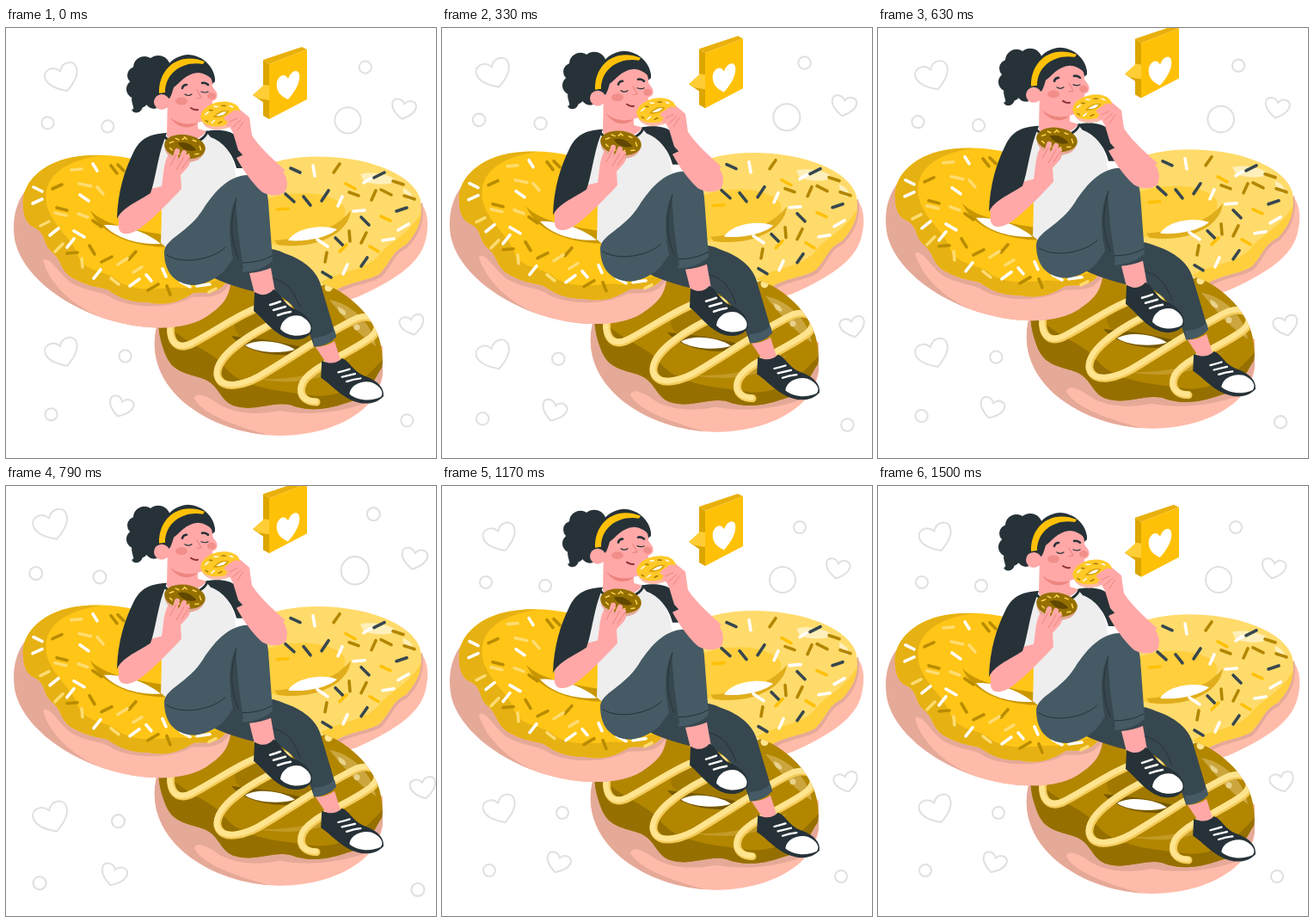
Recreate the animation shown at these times as an HTML page. Size 500 by 500 pixels, loop 1.54 s.

```html
<!DOCTYPE html>
<html lang="en">
<head>
<meta charset="utf-8">
<title>Doughnut break</title>
<style>
html, body { margin: 0; width: 100%; height: 100%; overflow: hidden; background: #fff; }
svg { display: block; width: 100vw; height: 100vh; }
.line { fill: none; stroke-linecap: round; stroke-linejoin: round; }
</style>
</head>
<body>
<svg viewBox="0 0 500 500">
<defs>
  <path id="heart" d="M0 16C-9 11-19 4-19-6C-19-15-6-18 0-8C6-18 19-15 19-6C19 4 9 11 0 16Z" vector-effect="non-scaling-stroke"/>
  <path id="drizzle" d="M193 337C187 368 201 375 217 367C248 351 278 328 310 320C335 318 336 331 306 346C273 363 244 385 246 404C250 423 280 416 304 400C340 378 380 351 409 338C432 331 439 348 425 360C397 381 348 397 344 417C341 429 350 435 361 435"/>
  <clipPath id="leftIcing"><use href="#leftTop"/></clipPath>
  <clipPath id="rightIcing"><use href="#rightTop"/></clipPath>
  <clipPath id="lowIcing"><use href="#lowTop"/></clipPath>
  <clipPath id="lowBase"><use href="#lowBody"/></clipPath>
</defs>

<g id="beat" fill="none" stroke="#e0e0e0" stroke-width="2">
  <use href="#heart" transform="translate(68 60) rotate(-20)"/>
  <use href="#heart" transform="translate(460 96) rotate(10) scale(.73)"/>
  <use href="#heart" transform="translate(470 344) rotate(-13) scale(.73)"/>
  <use href="#heart" transform="translate(68 376) rotate(-20)"/>
  <use href="#heart" transform="translate(135 438) rotate(18) scale(.73)"/>
  <circle cx="51" cy="112" r="7"/>
  <circle cx="120" cy="116" r="7"/>
  <circle cx="416" cy="48" r="7"/>
  <circle cx="396" cy="109" r="15"/>
  <circle cx="464" cy="454" r="7"/>
  <circle cx="140" cy="380" r="7"/>
  <circle cx="55" cy="447" r="7"/>
</g>

<g id="float">
  <g id="rightDoughnut">
    <path fill="#ffbba9" d="M483 205C491 213 492 231 488 246C481 277 446 295 415 310C390 322 350 328 320 320L300 230Z"/>
    <path fill="#e5a998" d="M484 203C488 228 478 244 466 256C450 263 450 276 436 290C418 299 402 298 382 311L370 290L460 220Z"/>
    <path id="rightTop" fill="#ffdb6b" d="M290 165C320 148 365 147 398 152C440 158 476 176 482 200C486 225 476 240 465 252C448 260 448 272 434 286C415 296 400 294 380 307C340 320 290 300 270 260Z"/>
    <g clip-path="url(#rightIcing)">
      <path fill="#ffcf3d" d="M488 203C474 240 444 248 434 264C416 284 386 282 366 296L376 320H410L490 260Z"/>
      <path fill="#ffcf3d" d="M300 200C330 188 380 188 394 209C398 226 376 247 345 252C320 257 300 248 300 248Z"/>
      <path fill="#e0ad1c" d="M312 247C345 244 380 238 401 212C398 242 355 258 316 252Z"/>
      <path fill="#fff" d="M328 247C338 231 370 228 385 234C375 243 350 249 328 247Z"/>
      <path fill="#ffefba" d="M412 170C428 166 448 171 454 178C444 184 426 182 416 178ZM462 186C470 189 475 196 472 201C465 200 461 192 462 186Z"/>
    </g>
    <g class="line" stroke-width="3.6">
      <path stroke="#37474f" d="M331 163l11 5M428 174l12-6M454 213l12-4M346 196l8 10M367 201l8-12M325 193l10 9M383 244l9 9M368 284l10 6M413 277l7-10M413 220l9 9"/>
      <path stroke="#fff" d="M357 160l2 12M404 213l13-1M438 247l13-2M362 246l12 8M456 235l12-7M386 207l5-11M392 286l5-11M416 180l8-5"/>
      <path stroke="#b38600" d="M381 168l7-10M399 191l11 4M425 200l5-11M450 178l12 4M436 188l12 6M413 250l6-12M399 236l1 12M371 272l2-11M463 195l12 4"/>
      <path stroke="#ffc107" d="M315 211l13-1M395 181l11 6M436 219l11 5M423 254l10 6M309 178l10 3M388 260l8-8"/>
    </g>
  </g>

  <g id="lowerDoughnut">
    <path id="lowBody" fill="#ffbba9" d="M178 338C165 374 176 412 213 440C245 464 285 474 322 474C375 473 431 449 438 404V370L300 330Z"/>
    <path fill="#e5a998" clip-path="url(#lowBase)" d="M165 330V480H330C285 468 232 454 219 431C221 423 230 427 241 433C260 448 288 451 318 445C349 450 378 449 413 438C430 431 439 410 440 385L380 360Z"/>
    <path id="lowTop" fill="#b38600" d="M178 335C176 351 180 366 186 381C194 400 211 402 227 407C250 414 247 435 268 440C290 446 309 434 330 438C356 448 378 442 402 434C422 428 429 406 437 395C442 360 421 325 384 304C330 275 210 280 178 335Z"/>
    <g clip-path="url(#lowIcing)">
      <path fill="#957000" d="M174 325C194 366 236 370 254 394C276 421 324 422 354 427C386 432 414 414 439 384V450H250L170 420Z"/>
      <path fill="#c39a25" d="M292 408C335 410 376 400 402 384C384 404 346 418 292 408Z"/>
      <path fill="#cba63e" d="M376 316C404 321 427 346 430 370C413 359 395 340 376 316Z"/>
      <ellipse cx="319" cy="347" rx="53" ry="25" fill="#a17900"/>
      <path fill="#775900" d="M262 358C278 378 326 388 357 373C339 371 312 362 285 361Z"/>
      <path fill="#fff" d="M278 369C290 361 320 363 336 374C320 379 292 378 278 369Z"/>
      <g class="line" stroke="#ffe48f">
        <use href="#drizzle" stroke="#f4cb5a" stroke-width="9"/>
        <use href="#drizzle" stroke-width="6.5" transform="translate(-1 -1)"/>
        <path stroke-width="9" d="M338 310C360 294 385 287 375 302"/>
      </g>
      <path fill="#e8d18a" d="M386 324q11 4 9 10q-9-1-9-10Z"/>
      <circle cx="408" cy="348" r="3.5" fill="#e8d18a"/>
    </g>
  </g>

  <g id="leftDoughnut">
    <path fill="#e5a998" d="M24 187C8 207 7 231 11 250C20 285 60 319 112 337C157 352 211 354 238 332C255 320 261 307 262 292L130 200Z"/>
    <path fill="#ffbba9" d="M43 270C51 265 58 282 75 296C94 307 111 305 125 315C151 327 193 326 216 313C235 312 249 315 260 298C260 311 253 322 238 332C211 354 157 352 112 337C74 322 49 294 43 270Z"/>
    <path id="leftTop" fill="#ffc517" d="M20 207C17 181 42 154 86 149C150 141 216 170 245 215C262 240 264 277 258 293C245 312 232 306 218 308C196 322 181 322 165 319C141 319 130 312 118 304C101 300 93 299 80 292C62 283 66 270 53 260C42 250 47 239 33 232C23 228 20 216 20 207Z"/>
    <g clip-path="url(#leftIcing)">
      <path fill="#e6b112" d="M15 170C30 150 70 145 112 148C62 155 40 177 48 208C57 235 80 247 84 266C95 287 119 281 133 296C159 310 188 300 204 302C226 304 235 293 260 290V330H60L10 220Z"/>
      <path fill="#c99700" d="M98 212C115 230 150 235 195 242L192 255C150 255 111 242 98 212Z"/>
      <path fill="#fff" d="M114 229C138 228 165 238 180 251C150 252 126 243 114 229Z"/>
    </g>
    <g class="line" stroke-width="3.6">
      <path stroke="#fff" d="M32 185l10 5M31 204l11-5M86 194l10 7M101 158l5 8M79 236l12 7M51 241l10-8M102 291l8-10M71 255l8-10M144 300l11-8M163 287l6 7M203 295l11 6M182 280l4 9M222 300l15-2"/>
      <path stroke="#b98c00" d="M54 187l11-5M59 209l12 3M122 160l7 9M111 272l12-6M97 253l6 10M71 262l12-1M165 305l12-7M130 159l7 7M101 224l10 7M143 269l8-9M187 300l4 10"/>
      <path stroke="#ffdc70" d="M76 165l12-1M85 181l14 3M57 215l13 3M57 260l9-9M84 216l11 4M130 275l11-7M122 291l9 7M88 268l1 10M106 185l7 8M148 284l10-6M40 230l10-5M236 307l8-4"/>
    </g>
  </g>

  <g id="girl">
    <g fill="#263238">
      <circle cx="161" cy="46" r="13"/><circle cx="177" cy="46" r="14"/><circle cx="151" cy="55" r="10"/>
      <circle cx="151" cy="71" r="11"/><circle cx="168" cy="68" r="17"/><circle cx="156" cy="83" r="10"/><circle cx="172" cy="84" r="10"/>
      <path d="M147 84C146 91 151 94 146 95C149 101 158 99 159 91ZM178 76C179 50 190 33 211 31C230 31 244 48 243 62L225 80L190 96Z"/>
    </g>
    <path fill="#ffa8a7" d="M188 80L187 126C200 136 224 133 233 120L223 117V85Z"/>
    <path fill="#ed847e" d="M191 104C201 112 213 113 223 110C216 118 200 118 191 104Z"/>
    <path fill="#ffa8a7" d="M189 80C190 63 204 52 223 50C235 51 241 58 240 68L245 75C247 82 243 84 240 85C240 96 236 109 222 110C206 112 191 103 189 80Z"/>
    <path fill="#263238" d="M182 79C183 58 197 42 217 40C237 40 244 55 243 63C237 56 230 52 223 52C209 53 202 64 195 69C193 76 192 79 190 82Z"/>
    <path fill="#ffc107" d="M178 76C177 48 200 27 231 39L229 42C206 38 185 52 185 75Z"/>
    <circle cx="181" cy="86" r="9" fill="#ffa8a7"/>
    <g fill="#ed847e" opacity=".7">
      <ellipse cx="204" cy="85" rx="7" ry="4.5"/><ellipse cx="239" cy="79" rx="5" ry="4"/>
    </g>
    <g class="line" stroke="#263238" stroke-width="1.2">
      <path d="M208 77q4 3 8 0M227 74q5 2 8 0"/>
      <path stroke-width="2.6" d="M205 70q1-4 5-4M228 64q4-1 7 2"/>
      <path stroke="#ed847e" d="M222 72l5 9-5 1"/>
      <path stroke="#8f303a" stroke-width="2" d="M215 93q4 3 8 2"/>
    </g>

    <path fill="#eee" d="M183 126C190 139 225 140 235 122C252 126 266 148 267 172L277 181L220 235L192 260L180 250C181 223 182 203 178 191L168 187Z"/>
    <path fill="#263238" d="M232 120C247 117 261 119 267 125L283 148L277 163L268 163C264 146 252 132 238 127Z"/>
    <path class="line" stroke="#263238" stroke-width="3" d="M184 126C195 140 228 137 234 121"/>

    <path id="rearLeg" fill="#37474f" d="M238 289C263 255 299 250 324 262C350 271 363 285 367 302L384 359Q374 370 358 370C352 350 342 327 321 313C295 309 262 301 238 289Z"/>
    <path fill="#455a64" d="M357 360Q372 360 382 351L384 359Q374 370 358 371Z"/>
    <path class="line" stroke="#263238" d="M304 290C326 293 334 304 342 325"/>
    <path fill="#455a64" d="M184 260C186 244 212 238 229 211C244 187 262 171 281 171C296 172 304 185 305 202L310 270Q300 282 275 284L270 263C259 280 242 297 219 299C194 298 184 282 184 260Z"/>
    <path fill="#37474f" d="M267 199C258 218 259 243 264 268L249 289C266 283 273 279 276 281L270 238Z"/>
    <path class="line" stroke="#263238" d="M268 198C260 225 261 246 270 268M187 264C205 276 241 269 255 255M275 273q20 0 34-8"/>

    <path fill="#ffa8a7" d="M283 285Q296 284 308 279L313 307L300 315L289 309ZM360 371Q374 370 382 364L389 386L376 395Z"/>
    <g id="shoe">
      <path fill="#263238" d="M289 307C297 312 305 311 311 304C319 307 322 320 334 326C351 333 357 343 356 353C347 365 332 364 321 358C308 351 299 338 288 329Z"/>
      <path fill="#fff" d="M319 350C320 338 333 332 343 335C353 340 357 348 353 354C343 360 327 359 319 350Z"/>
      <path class="line" stroke="#fff" stroke-width="2.5" d="M307 322q7-2 12-4M311 328q7-2 14-4M316 334q8-3 15-4"/>
    </g>
    <use href="#shoe" transform="matrix(1.07 0 0 .9 58 110.5)"/>

    <path fill="#ffa8a7" d="M130 204L164 188L181 184C183 173 183 160 187 151L193 138L207 140C215 144 217 152 212 161L203 171L204 187C194 198 171 222 156 233C139 244 129 240 131 226Z"/>
    <path fill="#263238" d="M187 122C165 123 155 130 148 145C138 165 130 190 129 222C135 209 151 203 168 192C173 180 176 153 183 133Z"/>
    <path fill="#ffa8a7" d="M268 151L285 143L316 162C327 168 329 182 325 190C319 197 303 195 297 190C285 179 275 164 268 151Z"/>
    <path fill="#ffa8a7" d="M257 109L265 96L271 94L283 104L286 125C297 142 316 157 325 166L300 175L270 142L264 122Z"/>

    <g transform="translate(208 138) rotate(8)">
      <ellipse cy="3" rx="23" ry="15" fill="#e5a998"/>
      <ellipse rx="24" ry="14" fill="#957000"/>
      <path fill="#614700" d="M-9-3Q3-8 14 2Q1 8-9-3Z"/>
      <path class="line" stroke="#ffd54f" stroke-width="1.5" d="M-18-2l4-2M-12-8l4 1M-2-11l3 2M8-9l4 1M17-3l2 4M13 7l4-1M3 10l3-2M-9 8l4 1M-17 4l3 2M-4-8l2-2"/>
    </g>
    <g transform="translate(249 100) rotate(-12)">
      <ellipse cy="4" rx="22" ry="14" fill="#ffbba9"/>
      <ellipse rx="23" ry="14" fill="#ffc928"/>
      <path fill="#d99f00" d="M-9 2Q1-6 11-1Q3 6-9 2Z"/>
      <path fill="#fff" d="M-5 1Q3-3 8-1Q3 4-5 1Z"/>
      <path class="line" stroke="#fff" stroke-width="1.5" d="M-17-3l4-2M-5-10l4 1M13-7l3 2M-12 8l4-2M8 9l3-2"/>
      <path class="line" stroke="#a47a00" stroke-width="1.5" d="M-11-7l3 1M4-9l4 1M-18 4l2 2M-4 10l4-1M16 3l3-2"/>
    </g>
    <g class="line" stroke="#ffa8a7" stroke-width="6">
      <path d="M193 163l6-20M199 165l8-20M205 163l6-13"/>
      <path d="M257 105l9-6M259 112l10-13M266 114l8-13"/>
    </g>
    <path class="line" stroke="#ed847e" d="M191 160l7-13M198 165l9-15M204 164l9-13M260 109l9-4M264 115l9-8M269 119l7-10"/>
  </g>
</g>

<g id="bubble">
  <path fill="#dda500" d="M299 37L306 42V106L299 102ZM287 78L305 64V84L300 87Z"/>
  <path fill="#e9b00c" d="M299 37L344 22L350 25L306 42Z"/>
  <path fill="#ffc107" d="M306 42L350 25V83L306 106Z"/>
  <path fill="#ffcd35" d="M287 78L300 66L306 67V84L294 82Z"/>
</g>
<g id="badge"><use href="#heart" fill="#fff" transform="matrix(.7 -.25 0 1 328 67)"/></g>
</svg>

<script>
const PERIOD = 1540, PHASE = 0.011;
const pulse = [[0, 1], [.1, 1.1], [.3, 1], [.4, 1], [.5, 1.1], [.6, 1], [1, 1]];
const [beat, float, bubble, badge] = ["beat", "float", "bubble", "badge"].map(id => document.getElementById(id));

function sample(keys, p) {
  const i = keys.findIndex(key => key[0] > p);
  const [p0, v0] = keys[i - 1], [p1, v1] = keys[i];
  return v0 + (v1 - v0) * (p - p0) / (p1 - p0);
}

const lift = (part, y) => part.setAttribute("transform", `translate(0 ${y})`);

function draw(time) {
  const p = (time / PERIOD + PHASE) % 1;
  const rise = 1 - Math.abs(1 - 2 * p);
  lift(float, .24 - 10 * rise);
  lift(bubble, .72 - 30 * rise);
  lift(badge, .48 - 20 * rise);
  beat.setAttribute("transform", `translate(266 251) scale(${sample(pulse, p)}) translate(-266 -251)`);
}

function tick() {
  draw(performance.now());
  requestAnimationFrame(tick);
}
tick();
</script>
</body>
</html>
```
